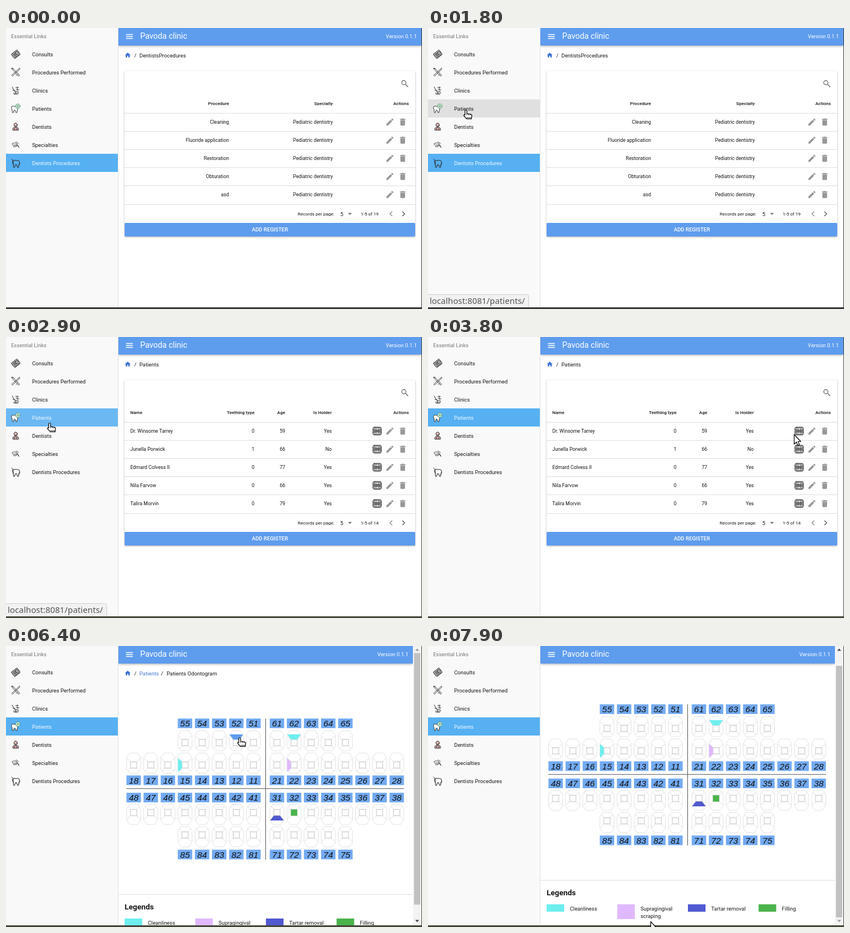
An HTML page for the animation above (8000 ms loop, 733 by 496 pixels).

```html
<!DOCTYPE html>
<html lang="en">
<head>
<meta charset="utf-8">
<title>Dental clinic admin</title>
<style>
  html, body { margin: 0; width: 100%; height: 100%; overflow: hidden; background: #fff; }
  svg { display: block; width: 733px; height: 496px; font-family: Roboto, sans-serif; }
  .card { filter: drop-shadow(0 1px 1.5px rgba(0, 0, 0, .32)); }
  .bar { filter: drop-shadow(0 1.5px 2px rgba(0, 0, 0, .35)); }
  .line { fill: none; stroke: #2b2b2b; stroke-width: .9; stroke-linejoin: round; stroke-linecap: round; }
  .num { font: italic 15.4px "Liberation Sans", Arial, sans-serif; fill: #111; text-anchor: middle; }
</style>
</head>
<body>
<svg id="stage" viewBox="0 0 733 496" xmlns="http://www.w3.org/2000/svg"></svg>
<script>
const LOOP = 8000, STEP = 100;
const BLUE = '#5e9cee', ACTIVE = '#56b0f2', INK = '#161616';

// markup helpers
const text = (x, y, s, size = 9.38, fill = INK, extra = '') =>
  `<text x="${x}" y="${y}" font-size="${size}" fill="${fill}" ${extra}>${s}</text>`;
const right = (x, y, s, size = 8.71, weight = 400) =>
  text(x, y, s, size, INK, `text-anchor="end" font-weight="${weight}"`);
const rect = (x, y, w, h, fill, extra = '') =>
  `<rect x="${x}" y="${y}" width="${w}" height="${h}" fill="${fill}" ${extra}/>`;
const path = (d, extra = '') => `<path d="${d}" ${extra}/>`;
const group = (s, extra = '') => `<g ${extra}>${s}</g>`;
const at = (x, y, s) => group(s, `transform="translate(${x} ${y})"`);
const glyph = (d, x, y, size, fill) =>
  path(d, `fill="${fill}" transform="translate(${x - size / 2} ${y - size / 2}) scale(${size / 24})"`);

const GLYPH = {
  edit: 'M3 17.25V21h3.75L17.8 9.9l-3.75-3.75zM20.7 7c.4-.4.4-1 0-1.4l-2.3-2.3c-.4-.4-1-.4-1.4 0l-1.9 1.8 3.8 3.8z',
  trash: 'M6 19c0 1.1.9 2 2 2h8c1.1 0 2-.9 2-2V7H6zM19 4h-3.5l-1-1h-5l-1 1H5v2h14z',
  home: 'M10 20v-6h4v6h5v-8h3L12 3 2 12h3v8z'
};
const TOOTH = 'M-5-4C-3-6 -1-4 1-4.5C5-5 6-2 4.5 1L3.5 6H2L.5 2H-1L-2.5 6H-4L-4.5 1C-6-1-6-3-5-4z';

const menuIcons = [
  group('<rect x="-6.5" y="-4.5" width="13" height="9" rx="1.2" fill="#aaa"/><path d="M-4-2H4M-4 0H4M-4 2H2M-6 5.5H6"/><circle cx="3" r="2" fill="#eee"/>', 'transform="rotate(-38)"'),
  path('M-7-6L5 7L7 5.5L-5-7zM6.5-7L-7 5.5L-5.5 7L7-5zM-7-7L-4-6M4 3L1 6'),
  path('M-5-4L-2 2H4L5 4M-4 5H5M0 2V6M-5-4L-6-6M3-6V-1H6M0-5H5M-5 0H-1M-3 7H4M1-2L4 0'),
  group(path(TOOTH, 'transform="translate(-1.5 1) scale(1.05)" fill="#fff"') +
    '<circle cx="3.8" cy="-4" r="4" fill="#d9f0dd" stroke="#4c8f6d"/><path d="M2-4H6M4-6V-2" stroke="#4c8f6d"/>'),
  '<circle cy="-2.5" r="3" fill="#e9c3bd"/><path d="M-5 6V3C-4 1 4 1 5 3V6zM-3-4C-2-7 2-7 3-4M-2-1H2" fill="#d7a9aa"/><path d="M-2 3V6M2 3V6"/>',
  group(path(TOOTH, 'transform="translate(-2 -.5) scale(.65) rotate(-20)" fill="#ddd"') + path('M1-5L5-2M2-2L5 4M-1 4L3 1M4 1L6 5')),
  group(path(TOOTH, 'transform="translate(1 1) scale(1.15)"') + path('M-7-7L-4-3L-4 3M5 5L7.5 1'))
];
const labels = ['Consults', 'Procedures Performed', 'Clinics', 'Patients', 'Dentists', 'Specialties', 'Dentists Procedures'];

function sidebar() {
  const items = labels.map((s, i) => {
    const y = 46 + 32 * i;
    return rect(0, y - 16, 197, 32, 'none', `id="row${i}"`) +
      at(17, y, group(menuIcons[i], 'class="line"')) +
      text(46, y + 4, s, 9.38, INK, `id="label${i}"`);
  });
  return rect(0, 0, 197, 493, '#f9f9f9') + rect(197, 0, 1, 493, '#e2e2e2') +
    text(9, 18, 'Essential Links', 9.38, '#757575') + items.join('');
}

const home = y => glyph(GLYPH.home, 214.5, y, 12, '#3b70d6') + text(226, y + 4, '/');

const jaw = at(654, 0,
  '<rect x="-7.5" y="-7" width="15" height="14" rx="3" fill="#e8e8e8"/>' +
  path('M-8-3C-4-1 4-1 8-3M-7 0H7M-8 3C-4 1 4 1 8 3M-6-6H6M-6 6H6M-5-5V5M-2-5V5M2-5V5M5-5V5'));

function table(title, heads, rows, total, withJaw) {
  let s = home(48) + text(235, 52, title) +
    group(rect(209, 76, 512, 292, '#fff', 'rx="1.5"'), 'class="card"') +
    path('M699 99.5L699 99.5M704 99.5L708.5 104', 'stroke="#757575" stroke-width="1.7"') +
    '<circle cx="701" cy="96.5" r="3.7" fill="none" stroke="#757575" stroke-width="1.4"/>';
  const cell = (col, y, v, size, weight) => col.left
    ? text(col.x, y, v, size, INK, `font-weight="${weight}"`)
    : right(col.x, y, v, size, weight);
  heads.forEach(h => { s += cell(h, 136, h.name, 8.04, 500); });
  s += right(710, 136, 'Actions', 8.04, 500);
  rows.forEach((row, i) => {
    const y = 166 + 32 * i;
    row.forEach((v, c) => { s += cell(heads[c], y + 3, v, 8.71, 400); });
    s += rect(209, y - 16, 512, 1, '#dedede');
    if (withJaw) s += at(0, y, group(jaw, 'class="line"'));
    s += glyph(GLYPH.edit, 676.5, y, 16.5, '#979797') + glyph(GLYPH.trash, 699, y, 16.5, '#979797');
  });
  return s + rect(209, 311, 512, 1, '#dedede') +
    right(578.5, 330.5, 'Records per page:', 8.04) + text(589, 331.5, '5') +
    path('M602.5 326.5h7l-3.5 3.5z', 'fill="#757575"') + text(625, 330.5, '1-5 of ' + total, 8.04) +
    path('M680.5 324L676.5 328L680.5 332', 'fill="none" stroke="#8a8a8a" stroke-width="1.3"') +
    path('M698.5 324L702.5 328L698.5 332', 'fill="none" stroke="#555" stroke-width="1.3"') +
    rect(209, 344, 512, 24, BLUE, 'rx="1.5"') +
    text(465, 359, 'ADD REGISTER', 9.38, '#fff', 'text-anchor="middle" font-weight="500"');
}

// odontogram: colours of the marked faces, keyed by tooth and face
const CYAN = '#6eeeee', LILAC = '#e0b8ff', INDIGO = '#5159d1', GREEN = '#4bb34b';
const marks = { '62top': CYAN, '15left': CYAN, '22left': LILAC, '31bottom': INDIGO, '32center': GREEN };
const chartRows = [
  { y: 170.5, labelY: 136.5, quads: [5, 6], count: 5, root: -1 },
  { y: 210, labelY: 237, quads: [1, 2], count: 8, root: -1 },
  { y: 294, labelY: 267.5, quads: [4, 3], count: 8, root: 1 },
  { y: 333.5, labelY: 368, quads: [8, 7], count: 5, root: 1 }
];
const teeth = chartRows.flatMap(r => r.quads.flatMap((q, side) =>
  Array.from({ length: r.count }, (_, i) => ({
    ...r, id: `${q}${i + 1}`, x: side ? 477.4 + 30.15 * i : 436 - 30.15 * i
  }))));

function face(name, root) {
  const top = root < 0 ? -14.5 : -13, low = root < 0 ? 13 : 14;
  return {
    top: `M-12 ${top}H12L5.5-5.5H-5.5z`,
    bottom: `M-12 ${low}H12L5.5 5.5H-5.5z`,
    left: 'M-12.3-12V12.5L-5.5 6V-6z',
    right: 'M12.3-12V12.5L5.5 6V-6z',
    center: 'M-5.5-5.5H5.5V5.5H-5.5z'
  }[name];
}

function tooth(t) {
  const fills = ['top', 'left', 'right', 'bottom', 'center']
    .filter(f => marks[t.id + f])
    .map(f => path(face(f, t.root), `fill="${marks[t.id + f]}"`)).join('');
  const outline = group(
    path('M-7-21H7L12.5-13V8L7 14.5H-7L-12.5 8V-13z', 'stroke="#e2e2e2"') +
    path('M-11.5-12L-5.5-5.5M11.5-12L5.5-5.5M-10.5 11L-5.5 5.5M10.5 11L5.5 5.5', 'stroke="#dedede"') +
    path(face('center'), 'stroke="#d2d2d2" stroke-width="1.3"'),
    `fill="none" transform="scale(1 ${-t.root})"`);
  return at(t.x, t.y, outline + fills) +
    rect(t.x - 12.7, t.labelY - 8.5, 25.4, 17, '#73aaf1') +
    `<text class="num" x="${t.x}" y="${t.labelY + 5.5}">${t.id}</text>`;
}

function odontogram() {
  const legend = [['Cleanliness', CYAN], ['Supragingival', LILAC], ['Tartar removal', INDIGO], ['Filling', GREEN]];
  return home(48) + text(235, 52, 'Patients', 9.38, '#4478cf') + text(273, 52, '/') + text(283, 52, 'Patients Odontogram') +
    teeth.map(tooth).join('') + path('', 'id="hover" fill="#5e9cee"') +
    rect(457, 128, 1, 249, '#555') + rect(212, 251.2, 489, 1, '#555') +
    rect(198, 438, 519, 1, '#dedede') + text(209, 465, 'Legends', 13.4, INK, 'font-weight="700"') +
    legend.map(([s, fill], i) => {
      const x = 209 + 124.5 * i;
      return rect(x, 481, 31, i === 1 ? 26 : 13, fill) + text(x + 41, 491.5, s) +
        (i === 1 ? text(x + 41, 504.5, 'scraping') : '');
    }).join('');
}

const header = rect(198, 0, 534, 31, BLUE, 'id="bar" class="bar"') +
  path('M211.5 11.5h12M211.5 15h12M211.5 18.5h12', 'stroke="#fff" stroke-width="1.4"') +
  text(236.5, 19, 'Pavoda clinic', 14.07, '#fff') +
  text(724, 18, 'Version 0.1.1', 9.38, '#fff', 'id="version" text-anchor="end"');

const scrollbar = rect(717, 0, 15, 493, '#f3f3f3') + rect(719, 12.5, 11, 444, '#c1c1c1', 'id="thumb"') +
  path('M721 8.5h7l-3.5-4z', 'id="up"') + path('M721 483.5h7l-3.5 4z', 'id="down"');

const status = path('M-1 494V470.5H174.5Q177.5 470.5 177.5 474V494z', 'fill="#f2f2f2" stroke="#cfcfcf"') +
  text(3, 487, 'localhost:8081/patients/', 14.8, '#555', 'font-family="Noto Sans, sans-serif"');

const hand = path('M-1.7 1.3C-1.7-.8 1.5-.8 1.5 1.3V6L8.3 7.3C9.8 7.6 10.4 8.5 10.2 9.8L9.5 15.3H1L-3.6 10C-4.6 8.4-3.2 7.2-1.7 8.6z') +
  path('M1.5 6V9M4.5 6.8V9M7.3 7.3V9.3M1 13.3H9.5', 'stroke-width=".8"');
const arrow = path('M.5 .5V17.5L4.4 14L7 20L9.8 18.8L7.2 13H12z');

const pages = {
  procedures: table('DentistsProcedures',
    [{ name: 'Procedure', x: 393 }, { name: 'Specialty', x: 576 }],
    ['Cleaning', 'Fluoride application', 'Restoration', 'Obturation', 'asd'].map(s => [s, 'Pediatric dentistry']), 19),
  patients: table('Patients',
    [{ name: 'Name', x: 219, left: true }, { name: 'Teething type', x: 438 }, { name: 'Age', x: 492 }, { name: 'Is Holder', x: 574 }],
    [['Dr. Winsome Tarrey', 0, 59, 'Yes'], ['Junella Porwick', 1, 66, 'No'], ['Edmard Colvess II', 0, 77, 'Yes'],
     ['Nila Farvow', 0, 66, 'Yes'], ['Talira Morvin', 0, 79, 'Yes']], 14, true),
  chart: odontogram()
};

const stage = document.getElementById('stage');
stage.innerHTML = '<clipPath id="view"><rect x="198" width="535" height="493"/></clipPath>' +
  rect(0, 0, 733, 496, '#fff') +
  group(Object.entries(pages).map(([k, s]) => group(s, `id="${k}"`)).join(''), 'clip-path="url(#view)"') +
  header + group(scrollbar, 'id="scrollbar"') + sidebar() + group(status, 'id="status"') +
  path('M0 493H732V0H733V496H0z', 'id="edge"') +
  group(group(hand, 'id="hand"') + group(arrow, 'id="arrow"'), 'id="cursor" fill="#fff" stroke="#000" stroke-width="1.2" stroke-linejoin="round"');

const $ = id => document.getElementById(id);
const show = (id, on) => $(id).setAttribute('display', on ? 'inline' : 'none');
const set = (id, name, v) => $(id).setAttribute(name, v);

// time, x, y of the pointer tip
const route = [
  [500, 92, 50], [900, 84, 220], [1300, 71, 150], [1800, 67, 145], [2000, 67, 145], [2500, 77, 152], [2900, 77, 152],
  [3300, 520, 185], [3500, 688, 168], [3700, 641, 174], [4100, 656, 164], [5600, 656, 164], [6400, 412, 162],
  [6500, 410, 163], [6700, 402, 188], [6800, 402, 188], [7100, 395, 240], [7400, 395, 240], [7700, 301, 380], [7900, 392, 486]
];
const scrollKeys = [[6800, 0], [7000, 5], [7100, 9], [7200, 18], [7300, 25]];

function track(keys, t) {
  const n = keys.findIndex(k => k[0] > t);
  if (n === 0) return keys[0].slice(1);
  if (n < 0) return keys[keys.length - 1].slice(1);
  const a = keys[n - 1], b = keys[n], p = (t - a[0]) / (b[0] - a[0]);
  return a.slice(1).map((v, i) => v + (b[i + 1] - v) * p);
}

function faceUnder(x, y) {
  for (const t of teeth) {
    const dx = x - t.x, dy = y - t.y, ax = Math.abs(dx), ay = Math.abs(dy);
    if (ax > 12 || ay > 14) continue;
    const name = Math.max(ax, ay) < 5.5 ? 'center' : ax > ay ? (dx < 0 ? 'left' : 'right') : dy < 0 ? 'top' : 'bottom';
    return { t, name };
  }
}

function draw(time) {
  const t = Math.floor(time / STEP) * STEP;
  const [x, y] = track(route, t), [scroll] = track(scrollKeys, t);
  const chart = t >= 5100, visible = t >= 500;

  show('procedures', t < 2200);
  show('patients', t >= 2200 && t < 5000);
  show('chart', chart);
  show('scrollbar', chart);
  show('status', t >= 1400 && t < 3100);

  const active = t < 2200 ? 6 : 3;
  const over = visible && x < 197 && y < 254 ? Math.floor((y - 30) / 32) : -1;
  labels.forEach((_, i) => {
    const on = i === active;
    set('row' + i, 'fill', on ? (i === over ? '#6bb8f3' : ACTIVE) : i === over ? '#e0e0e0' : 'none');
    set('label' + i, 'fill', on ? '#f4faff' : INK);
  });

  set('bar', 'width', chart ? 519 : 534);
  set('version', 'x', chart ? 709 : 724);
  set('chart', 'transform', `translate(0 ${-scroll})`);
  set('thumb', 'y', 12.5 + .9 * scroll);
  set('up', 'fill', scroll > 0 ? '#444' : '#999');
  set('down', 'fill', scroll < 25 ? '#444' : '#999');

  const hit = chart && faceUnder(x, y + scroll);
  show('hover', hit);
  if (hit) {
    set('hover', 'd', face(hit.name, hit.t.root));
    set('hover', 'transform', `translate(${hit.t.x} ${hit.t.y})`);
  }

  const pointing = over >= 0 || (t >= 3900 && t < 5000) || (chart && x < 611 && t < 7600);
  show('cursor', visible);
  show('hand', pointing);
  show('arrow', !pointing);
  set('cursor', 'transform', `translate(${x} ${y})`);
  set('edge', 'fill', t < 2000 ? '#383838' : '#47473a');
}

const start = performance.now();
function tick() {
  draw((performance.now() - start) % LOOP);
  requestAnimationFrame(tick);
}
tick();
</script>
</body>
</html>
```
